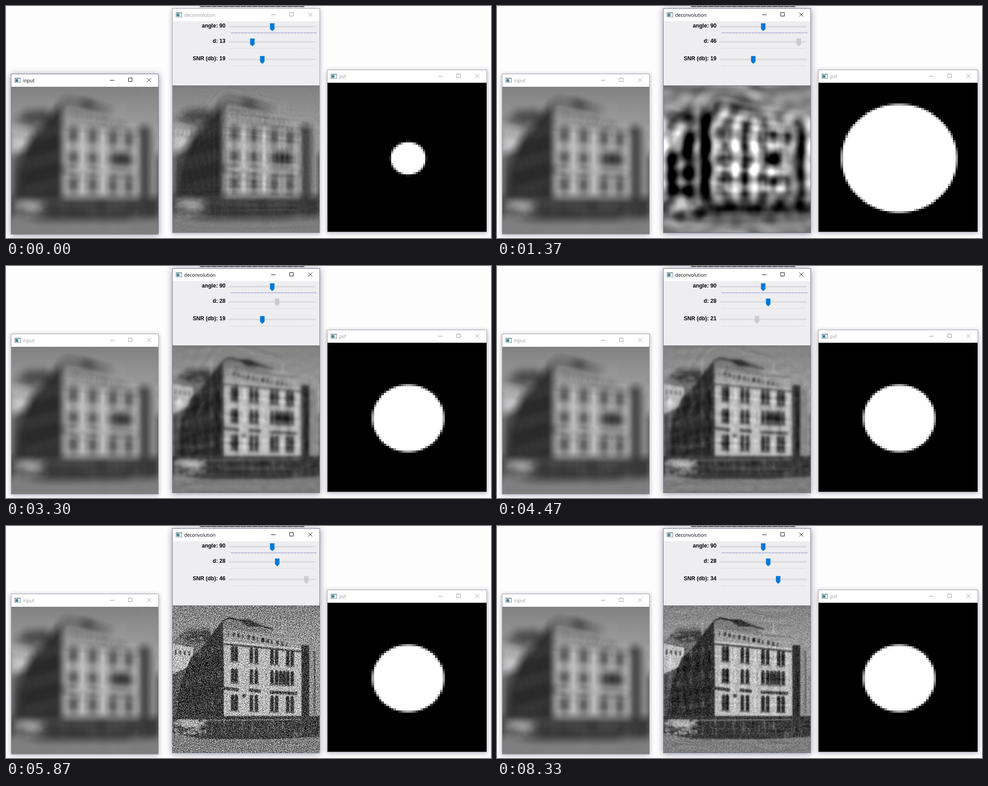
An HTML page with a canvas that plays this animation: 1083x517 px, repeating every 8.36 s.

```html
<!DOCTYPE html>
<html lang="en">
<head>
<meta charset="utf-8">
<title>deconvolution</title>
<style>
  html, body { margin: 0; width: 100%; height: 100%; overflow: hidden; background: #fdfdfd; }
  canvas { display: block; }
</style>
</head>
<body>
<canvas id="stage" width="1083" height="517"></canvas>
<script>
const stage = document.getElementById('stage').getContext('2d');
const LOOP = 8360, STEPS = 250, N = 256, VIEW = 328, SCALE = N / VIEW, TRUE_D = 28;

// Slider positions as [time, value] points
const D_KEYS = [[430, 13], [1370, 47], [1480, 50], [1780, 50], [2430, 34], [3000, 25], [3500, 30], [3900, 28]];
const SNR_KEYS = [[4400, 19], [4470, 21.4], [5270, 48], [5350, 50], [5700, 50], [6500, 29], [6870, 32], [7250, 36], [7700, 34]];

function valueAt(keys, t) {
  if (t <= keys[0][0]) return keys[0][1];
  for (let i = 1; i < keys.length; i++) {
    const [t0, v0] = keys[i - 1], [t1, v1] = keys[i];
    if (t < t1) return v0 + (v1 - v0) * (t - t0) / (t1 - t0);
  }
  return keys[keys.length - 1][1];
}

let seed = 7;
const random = () => (seed = (seed * 16807) % 2147483647) / 2147483647;
const clamp = (v) => Math.max(0, Math.min(1, v));

function makeCanvas(w, h = w) {
  const c = document.createElement('canvas');
  c.width = w;
  c.height = h;
  return c.getContext('2d');
}

function grayCanvas(size, valueOf) {
  const c = makeCanvas(size), img = c.createImageData(size, size);
  const words = new Uint32Array(img.data.buffer);
  for (let i = 0; i < words.length; i++) {
    words[i] = 0xff000000 | Math.round(255 * clamp(valueOf(i))) * 0x10101;
  }
  c.putImageData(img, 0, 0);
  return c.canvas;
}

// ---- 2D Fourier transform ----
const reversed = new Uint16Array(N), cosT = new Float32Array(N), sinT = new Float32Array(N);
for (let i = 0; i < N; i++) {
  reversed[i] = (reversed[i >> 1] >> 1) | (i & 1 ? N / 2 : 0);
  cosT[i] = Math.cos(2 * Math.PI * i / N);
  sinT[i] = Math.sin(2 * Math.PI * i / N);
}

function fftRow(re, im, start, sign) {
  for (let i = 0; i < N; i++) {
    const j = reversed[i];
    if (j <= i) continue;
    const a = start + i, b = start + j;
    let s = re[a]; re[a] = re[b]; re[b] = s;
    s = im[a]; im[a] = im[b]; im[b] = s;
  }
  for (let half = 1; half < N; half *= 2) {
    const turn = N / (2 * half);
    for (let k = start; k < start + N; k += 2 * half) {
      for (let m = 0; m < half; m++) {
        const c = cosT[m * turn], s = sign * sinT[m * turn];
        const a = k + m, b = a + half;
        const xr = re[b] * c - im[b] * s, xi = re[b] * s + im[b] * c;
        re[b] = re[a] - xr; im[b] = im[a] - xi;
        re[a] += xr; im[a] += xi;
      }
    }
  }
}

function transpose(v) {
  for (let y = 0; y < N; y++) {
    for (let x = 0; x < y; x++) {
      const a = y * N + x, b = x * N + y, s = v[a];
      v[a] = v[b];
      v[b] = s;
    }
  }
}

// The spectrum stays transposed; the inverse turns it back
function fft2(re, im, sign) {
  for (let i = 0; i < N; i++) fftRow(re, im, i * N, sign);
  transpose(re);
  transpose(im);
  for (let i = 0; i < N; i++) fftRow(re, im, i * N, sign);
}

// Distance of each frequency from zero, in quarter steps
const FINE = 4, radius = new Uint16Array(N * N);
for (let i = 0; i < N * N; i++) {
  const x = i % N, y = i >> 8;
  radius[i] = Math.round(FINE * Math.hypot(Math.min(x, N - x), Math.min(y, N - y)));
}

// Radial spectrum of a disk of diameter d
function diskSpectrum(d) {
  const r = (d / 2 + 0.15) * SCALE, samples = 48;
  const table = new Float32Array(FINE * N * 0.72);
  for (let q = 0; q < samples; q++) {
    const angle = (q + 0.5) / samples * Math.PI / 2;
    const weight = 2 / samples * Math.cos(angle) ** 2;
    const rate = 2 * Math.PI * r * Math.sin(angle) / (N * FINE);
    for (let k = 0; k < table.length; k++) table[k] += weight * Math.cos(rate * k);
  }
  return table;
}

// ---- The photographed house ----
function drawHouse(g) {
  const gray = (v) => `rgb(${v},${v},${v})`;
  const poly = (v, ...p) => {
    g.fillStyle = gray(v);
    g.beginPath();
    for (let i = 0; i < p.length; i += 2) g.lineTo(p[i], p[i + 1]);
    g.fill();
  };
  const rect = (v, x, y, w, h) => { g.fillStyle = gray(v); g.fillRect(x, y, w, h); };
  const line = (v, width, ...p) => {
    g.strokeStyle = gray(v);
    g.lineWidth = width;
    g.beginPath();
    for (let i = 0; i < p.length; i += 2) g.lineTo(p[i], p[i + 1]);
    g.stroke();
  };
  const scatter = (count, x, y, w, h, sw, sh, low, high) => {
    for (let i = 0; i < count; i++) {
      rect(Math.round(low + random() * (high - low)), x + random() * w, y + random() * h, sw, sh);
    }
  };

  g.scale(SCALE, SCALE);
  const sky = g.createLinearGradient(0, 0, 0, 90);
  sky.addColorStop(0, gray(130));
  sky.addColorStop(1, gray(156));
  g.fillStyle = sky;
  g.fillRect(0, 0, VIEW, VIEW);

  // neighbours on the left
  poly(112, 0, 82, 18, 62, 30, 50, 85, 48, 110, 60, 60, 110, 0, 260);
  poly(66, 14, 64, 40, 56, 90, 56, 80, 80, 42, 84);
  scatter(26, 15, 50, 65, 32, 8, 3, 50, 150);
  poly(196, 0, 84, 46, 94, 44, 134, 0, 152);
  for (let i = 0; i < 4; i++) rect(70, 5 + i * 10, 98 + i, 4, 10);
  poly(84, 0, 152, 42, 134, 18, 255, 0, 255);
  rect(165, 85, 35, 4, 34);

  // shaded side wall
  poly(46, 112, 32, 117, 250, 8, 257, 14, 190, 40, 116, 62, 98, 84, 68);
  for (let col = 0; col < 6; col++) {
    for (let row = 0; row < 5; row++) {
      const y = 108 + row * 30 - col * 4;
      if (row || col > 1) rect(row % 2 ? 22 : 78, 30 + col * 14, y, 5, 12);
    }
  }

  // roof and attic
  poly(122, 112, 32, 125, 25, 195, 36, 222, 62, 118, 52);
  poly(52, 146, 30, 172, 30, 200, 46, 168, 46);
  line(40, 3, 112, 34, 127, 27, 196, 44, 224, 52);
  poly(158, 116, 50, 283, 80, 285, 96, 116, 80);
  for (let i = 0; i < 13; i++) rect(i === 7 ? 20 : 66, 123 + i * 10.8, 57 + i * 2.1, i % 3 ? 6 : 3, 9);
  rect(175, 244, 38, 3, 22);

  // sunlit front
  poly(190, 115, 78, 286, 95, 289, 246, 114, 246);
  line(70, 4, 113, 85, 286, 102);
  line(205, 3, 113, 80, 286, 96);

  const windowAt = (x, y, h) => {
    g.fillStyle = gray(42);
    g.beginPath();
    g.ellipse(x, y - h / 2 + 5, 3.8, 7, 0, Math.PI, 0);
    g.rect(x - 3.8, y - h / 2 + 5, 7.6, h - 5);
    g.fill();
    rect(105, x - 6, y + h / 2, 12, 3);
  };
  for (const x of [134, 142, 176, 187, 222, 232, 257, 267]) {
    const drop = (x - 134) / 134;
    windowAt(x, 107 + 11 * drop, 32);
    windowAt(x, 156 + 6 * drop, 30);
    windowAt(x, 216 + 4 * drop, 34);
  }
  for (const x of [241, 249]) windowAt(x, 161, 30);
  line(62, 7, 109, 183, 148, 188);
  line(62, 7, 170, 188, 197, 191);
  line(62, 7, 217, 193, 278, 196);
  rect(60, 156, 197, 7, 8);

  // right edge
  rect(42, 288, 88, 17, 162);
  rect(150, 305, 74, 23, 176);
  rect(88, 315, 100, 4, 140);

  // garden, fence and water
  rect(56, 0, 246, VIEW, 52);
  scatter(90, 0, 250, 320, 30, 2, 16, 18, 130);
  scatter(60, 0, 252, 70, 34, 8, 6, 70, 190);
  rect(176, 20, 254, 38, 16);
  line(150, 2, 62, 256, 285, 254);
  poly(126, 0, 284, 60, 297, 190, 300, VIEW, 292, VIEW, VIEW, 0, VIEW);
  scatter(60, 0, 298, 320, 28, 16, 1.5, 106, 146);
}

const scene = makeCanvas(N);
drawHouse(scene);
const pixels = scene.getImageData(0, 0, N, N).data;
const photoRe = new Float32Array(N * N), photoIm = new Float32Array(N * N);
for (let i = 0; i < N * N; i++) photoRe[i] = pixels[i * 4] / 255;
fft2(photoRe, photoIm, -1);
const trueDisk = diskSpectrum(TRUE_D);
for (let i = 0; i < N * N; i++) {
  const k = trueDisk[radius[i]] / (N * N);
  photoRe[i] *= k;
  photoIm[i] *= k;
}
fft2(photoRe, photoIm, 1);
const blurred = grayCanvas(N, (i) => photoRe[i]);
for (let i = 0; i < N * N; i++) {
  photoRe[i] += (random() + random() - 1) * 0.009;
  photoIm[i] = 0;
}
fft2(photoRe, photoIm, -1);

const cache = new Map();
function cached(key, make) {
  if (!cache.has(key)) cache.set(key, make());
  return cache.get(key);
}

const outRe = new Float32Array(N * N), outIm = new Float32Array(N * N);
function wiener(d, snr) {
  const noise = 10 ** (-0.1 * snr);
  const gain = diskSpectrum(d).map((h) => h / (h * h + noise) / (N * N));
  for (let i = 0; i < N * N; i++) {
    const k = gain[radius[i]];
    outRe[i] = photoRe[i] * k;
    outIm[i] = photoIm[i] * k;
  }
  fft2(outRe, outIm, 1);
  return grayCanvas(N, (i) => outRe[i]);
}

const diskImage = (d) =>
  grayCanvas(65, (i) => d / 2 + 1.15 - Math.hypot(i % 65 - 32.5, Math.floor(i / 65) - 32.5));

// ---- Windows and sliders ----
function box(g, color, x, y, w, h) {
  g.fillStyle = color;
  g.fillRect(x, y, w, h);
}

function drawWindow(g, x, y, w, h, title, active) {
  g.save();
  g.shadowColor = active ? 'rgba(20,20,60,.45)' : 'rgba(20,20,60,.32)';
  g.shadowBlur = active ? 14 : 10;
  g.shadowOffsetY = 2;
  box(g, active ? '#70758a' : '#a2a2ac', x, y, w, h);
  g.restore();
  box(g, '#fff', x + 1, y + 1, w - 2, h - 2);

  box(g, '#8295a0', x + 8, y + 9, 14, 11);
  box(g, '#e4eef0', x + 9, y + 11, 12, 8);
  box(g, '#3f8791', x + 10, y + 12, 6, 6);

  const ink = active ? '#000' : '#999';
  g.fillStyle = ink;
  g.font = '10.5px "Open Sans", sans-serif';
  g.fillText(title, x + 27, y + 18.5);

  const right = x + w, cy = y + 14;
  g.strokeStyle = ink;
  g.lineWidth = 1;
  g.beginPath();
  g.moveTo(right - 109, cy + .5);
  g.lineTo(right - 99, cy + .5);
  g.rect(right - 67.5, cy - 4.5, 8, 8);
  g.moveTo(right - 26, cy - 4.5);
  g.lineTo(right - 17, cy + 4.5);
  g.moveTo(right - 17, cy - 4.5);
  g.lineTo(right - 26, cy + 4.5);
  g.stroke();
}

function drawTrack(g, max, y) {
  box(g, '#d2d2d6', 497, y - 2, 194, 3);
  box(g, '#e9e9ec', 498, y - 1, 192, 1);
  if (max > 100) {
    for (let x = 502; x < 687; x += 7.4) box(g, '#bdbde0', x, y + 12, 6.4, 2.5);
  } else {
    for (let i = 0; i <= max; i++) box(g, '#c6c6cc', Math.round(502 + i * 185 / max), y + 13, 1, 2);
  }
}

function desktop(focused) {
  const g = makeCanvas(1083, 517);
  box(g, '#fdfdfd', 0, 0, 1083, 517);
  g.save();
  g.filter = 'blur(1.3px)';
  for (let x = 433; x < 655; x += 13) box(g, '#3a3a3a', x, -4, 12, 6);
  g.restore();

  drawWindow(g, 11, 151, 330, 358, 'input', !focused);
  g.drawImage(blurred, 12, 180, VIEW, VIEW);
  drawWindow(g, 717, 142, 357, 362, 'psf', false);
  drawWindow(g, 371, 5, 330, 501, 'deconvolution', focused);
  box(g, '#eeeef1', 372, 34, 328, 143);
  box(g, '#70707a', 372, 177, 328, 1);
  drawTrack(g, 180, 46.5);
  drawTrack(g, 50, 80.5);
  drawTrack(g, 50, 119.5);
  return g.canvas;
}

function drawSlider(label, value, max, y, dragged) {
  stage.fillStyle = '#000';
  stage.textAlign = 'right';
  stage.font = 'bold 12.2px "Liberation Sans", Arial, sans-serif';
  stage.fillText(`${label}: ${Math.round(value)}`, 490, y + 1);
  const x = 502 + value * 185 / max;
  stage.fillStyle = dragged ? '#ccc' : '#0078d7';
  stage.beginPath();
  for (const [dx, dy] of [[-5, -8], [5, -8], [5, 4.5], [0, 9.5], [-5, 4.5]]) stage.lineTo(x + dx, y + dy);
  stage.fill();
}

function draw(t) {
  const d = valueAt(D_KEYS, t), snr = valueAt(SNR_KEYS, t), focused = t >= 330;
  const dShown = Math.round(d), snrShown = Math.round(snr);

  stage.drawImage(cached(focused, () => desktop(focused)), 0, 0);
  stage.imageSmoothingEnabled = false;
  stage.drawImage(cached(dShown, () => diskImage(dShown)), 718, 171, 355, 332);
  stage.imageSmoothingEnabled = true;
  stage.drawImage(cached(`${dShown}/${snrShown}`, () => wiener(dShown, snrShown)), 372, 178, VIEW, 327);
  drawSlider('angle', 90, 180, 46.5, false);
  drawSlider('d', d, 50, 80.5, t >= 400 && t < 4290);
  drawSlider('SNR (db)', snr, 50, 119.5, t >= 4380 && t < 8050);
}

let shownStep = -1;
function tick() {
  const step = Math.floor(performance.now() % LOOP / LOOP * STEPS);
  if (step !== shownStep) draw((step + 0.5) * LOOP / STEPS);
  shownStep = step;
  requestAnimationFrame(tick);
}
tick();
</script>
</body>
</html>
```
